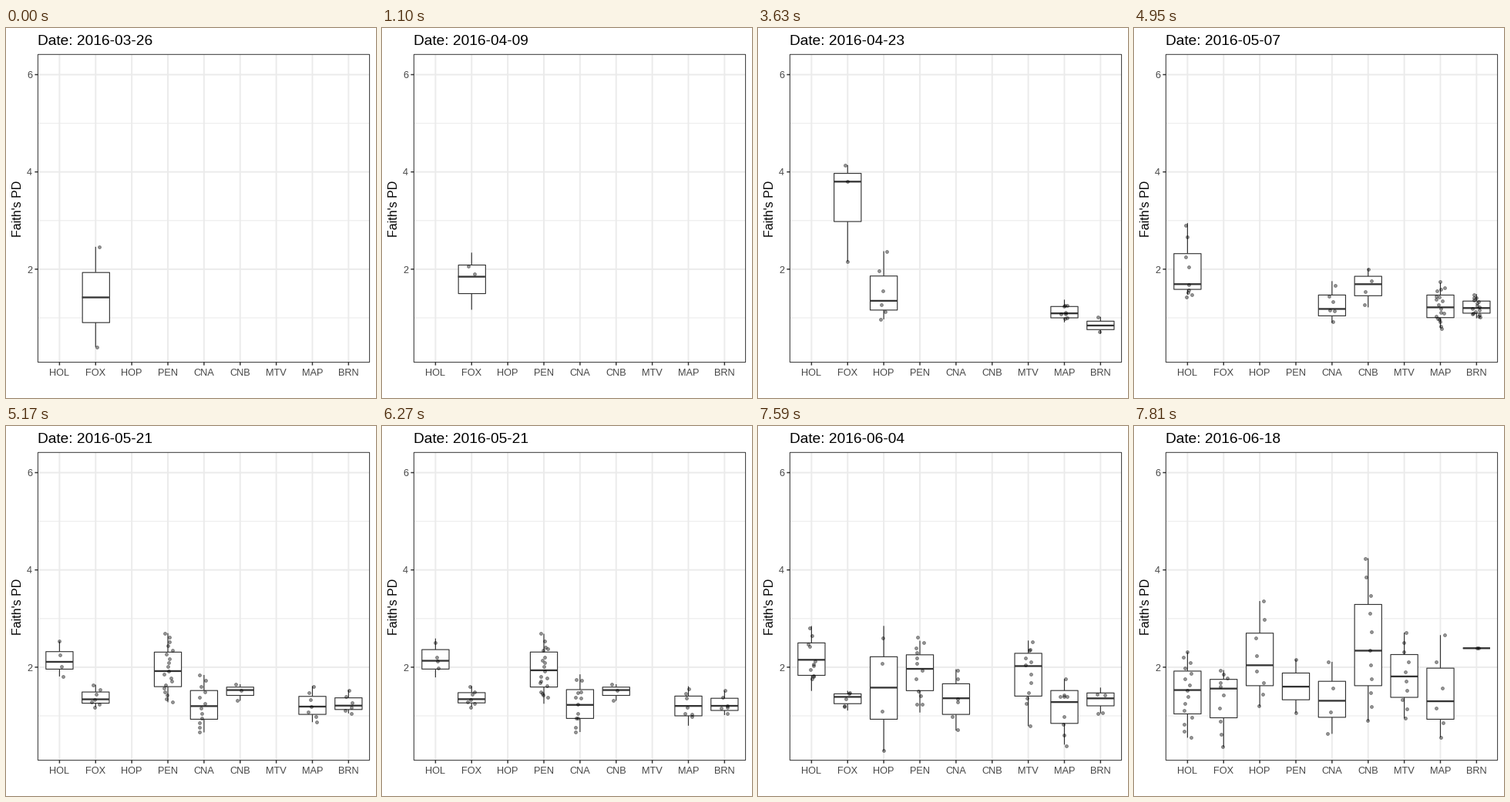
Recreate the animation shown at these times as a matplotlib script. Size 480 px wide and 480 px high, loop 8000 ms.

```python
import numpy as np
import matplotlib.pyplot as plt
from matplotlib.animation import FuncAnimation
from matplotlib.collections import LineCollection, PolyCollection

SIZE, DPI = 480, 100
INTERVAL, FRAMES = 40, 200
STEP_MS, CYCLE, MOVE = 110, 12, 3
SITES = "HOL FOX HOP PEN CNA CNB MTV MAP BRN".split()
DATES = np.arange("2016-03-26", "2016-07-02", 14, dtype="datetime64[D]")
CENTRE = {s: 69.4 + 46.87 * i for i, s in enumerate(SITES)}
HALF_BOX, JITTER = 17.6, 6
LEFT, RIGHT, TOP, BOTTOM = 41.4, 471.6, 34.3, 433.6
DARK, TEXT, GRID = "#333333", "#454545", "#ebebeb"

# Per date and site: sample size, then lower quartile, median, upper quartile.
SUMMARY = [
    dict(FOX=(2, .91, 1.42, 1.94)),
    dict(FOX=(6, 1.61, 1.92, 2.12), HOP=(4, 1.17, 1.36, 1.49),
         MAP=(4, .81, .86, .97), BRN=(4, .84, 1.00, 1.13)),
    dict(FOX=(3, 2.98, 3.80, 3.97), HOP=(6, 1.16, 1.35, 1.86),
         MAP=(8, 1.00, 1.07, 1.19), BRN=(2, .70, .78, .86)),
    dict(HOL=(9, 1.52, 1.62, 2.32), CNA=(6, 1.06, 1.18, 1.46),
         CNB=(4, 1.46, 1.72, 1.90), MAP=(18, 1.00, 1.22, 1.48),
         BRN=(16, 1.09, 1.20, 1.34)),
    dict(HOL=(4, 1.96, 2.11, 2.32), FOX=(7, 1.26, 1.34, 1.49),
         PEN=(19, 1.60, 1.92, 2.31), CNA=(12, .93, 1.20, 1.52),
         CNB=(3, 1.42, 1.53, 1.59), MAP=(7, 1.03, 1.19, 1.40),
         BRN=(6, 1.13, 1.21, 1.37)),
    dict(HOL=(11, 1.97, 2.26, 2.60), FOX=(5, 1.30, 1.36, 1.40),
         HOP=(4, .81, 1.50, 2.13), PEN=(12, 1.55, 2.03, 2.32),
         CNA=(6, 1.04, 1.37, 1.65), MTV=(12, 1.41, 2.06, 2.29),
         MAP=(9, .83, 1.28, 1.44), BRN=(4, 1.00, 1.18, 1.31)),
    dict(HOL=(15, 1.04, 1.53, 1.92), FOX=(10, .96, 1.56, 1.75),
         HOP=(8, 1.62, 2.04, 2.70), PEN=(2, 1.33, 1.60, 1.88),
         CNA=(4, .97, 1.31, 1.71), CNB=(11, 1.62, 2.34, 3.29),
         MTV=(10, 1.38, 1.81, 2.26), MAP=(6, .93, 1.30, 1.98),
         BRN=(2, 2.39, 2.39, 2.39)),
]

plt.rcParams.update({"path.snap": False, "font.family": "Liberation Sans"})
rng = np.random.default_rng(7)


def y_pos(value):
    return 439.1 - 63.1 * np.asarray(value)


def make_group(n, q1, mid, q3):
    """Whiskers reach as far past each quartile as the median lies inside it."""
    five = [2 * q1 - mid, q1, mid, q3, 2 * q3 - mid]
    values = np.interp(np.linspace(0, 1, n), np.linspace(0, 1, 5), five)
    dots = np.column_stack([rng.uniform(-JITTER, JITTER, n), y_pos(values)])
    return y_pos(five), rng.permutation(dots)


STATES = [{site: make_group(*stats) for site, stats in summary.items()}
          for summary in SUMMARY]


def ease(u):
    """Cubic in and out."""
    return 4 * u ** 3 if u < .5 else 1 - 4 * (1 - u) ** 3


def blend(start, end, f):
    """Move the rows that have a partner; the others stay in place."""
    out = start.copy()
    n = min(len(start), len(end))
    out[:n] += f * (end[:n] - start[:n])
    return out


def px(n):
    return n * 72 / DPI


fig = plt.figure(figsize=(SIZE / DPI, SIZE / DPI), dpi=DPI, facecolor="white")
ax = fig.add_axes([0, 0, 1, 1])
ax.set(xlim=(0, SIZE), ylim=(SIZE, 0))
ax.axis("off")


def lines(segments, color, width, z):
    return ax.add_collection(LineCollection(
        segments, colors=color, linewidths=px(width), capstyle="butt",
        zorder=z))


def across(values):
    return [[(LEFT, y_pos(v)), (RIGHT, y_pos(v))] for v in values]


def label(x, y, s, size, color="black", **kw):
    return ax.text(x, y, s, fontsize=px(size), color=color, **kw)


columns = CENTRE.values()
lines(across([1, 3, 5]), GRID, 1, 1)
lines(across([2, 4, 6]) + [[(x, TOP), (x, BOTTOM)] for x in columns],
      GRID, 1.9, 1)
lines([[(LEFT - 4, y_pos(v)), (LEFT, y_pos(v))] for v in (2, 4, 6)]
      + [[(x, BOTTOM), (x, BOTTOM + 4)] for x in columns], DARK, 1.5, 6)
ax.add_patch(plt.Rectangle((LEFT, TOP), RIGHT - LEFT, BOTTOM - TOP, fill=False,
                           ec=DARK, lw=px(1), zorder=6))
for v in (2, 4, 6):
    label(34.2, y_pos(v) + 4.6, v, 12.8, TEXT, ha="right")
for site, x in CENTRE.items():
    label(x, 451, site, 12.8, TEXT, ha="center")
label(19.8, 234, "Faith's PD", 16, rotation=90, rotation_mode="anchor",
      ha="center", va="baseline")
title = label(40.7, 21.8, "", 19.2)

whiskers = lines([], DARK, 1.15, 3)
boxes = ax.add_collection(PolyCollection(
    [], facecolors="white", edgecolors=DARK, linewidths=px(1.15), zorder=4))
medians = lines([], DARK, 2.3, 4.5)
dots = ax.scatter([], [], s=px(3.9) ** 2, facecolors=(0, 0, 0, .4),
                  edgecolors=(0, 0, 0, .4), linewidths=px(.9), zorder=5)


def update(i):
    step = ((i + 1) * INTERVAL - 1) // STEP_MS
    k, phase = divmod(step, CYCLE)
    u = max(0, phase - CYCLE + MOVE + 1) / MOVE
    if u == 1:
        k, u = k + 1, 0
    title.set_text(f"Date: {DATES[k + (u > .5)]}")
    upcoming = STATES[min(k + 1, len(STATES) - 1)]

    stems, rects, bars, spots = [], [], [], []
    for site, now in STATES[k].items():
        five, points = (blend(start, end, ease(u)) for start, end
                        in zip(now, upcoming.get(site, now)))
        low, q1, mid, q3, high = five
        x = CENTRE[site]
        a, b = x - HALF_BOX, x + HALF_BOX
        stems += [[(x, low), (x, q1)], [(x, q3), (x, high)]]
        rects.append([(a, q1), (b, q1), (b, q3), (a, q3)])
        bars.append([(a, mid), (b, mid)])
        spots.append(points + [x, 0])
    whiskers.set_segments(stems)
    boxes.set_verts(rects)
    medians.set_segments(bars)
    dots.set_offsets(np.vstack(spots))
    return title, whiskers, boxes, medians, dots


anim = FuncAnimation(fig, update, frames=FRAMES, interval=INTERVAL,
                     repeat=True, repeat_delay=0, blit=False)
plt.show()
```
